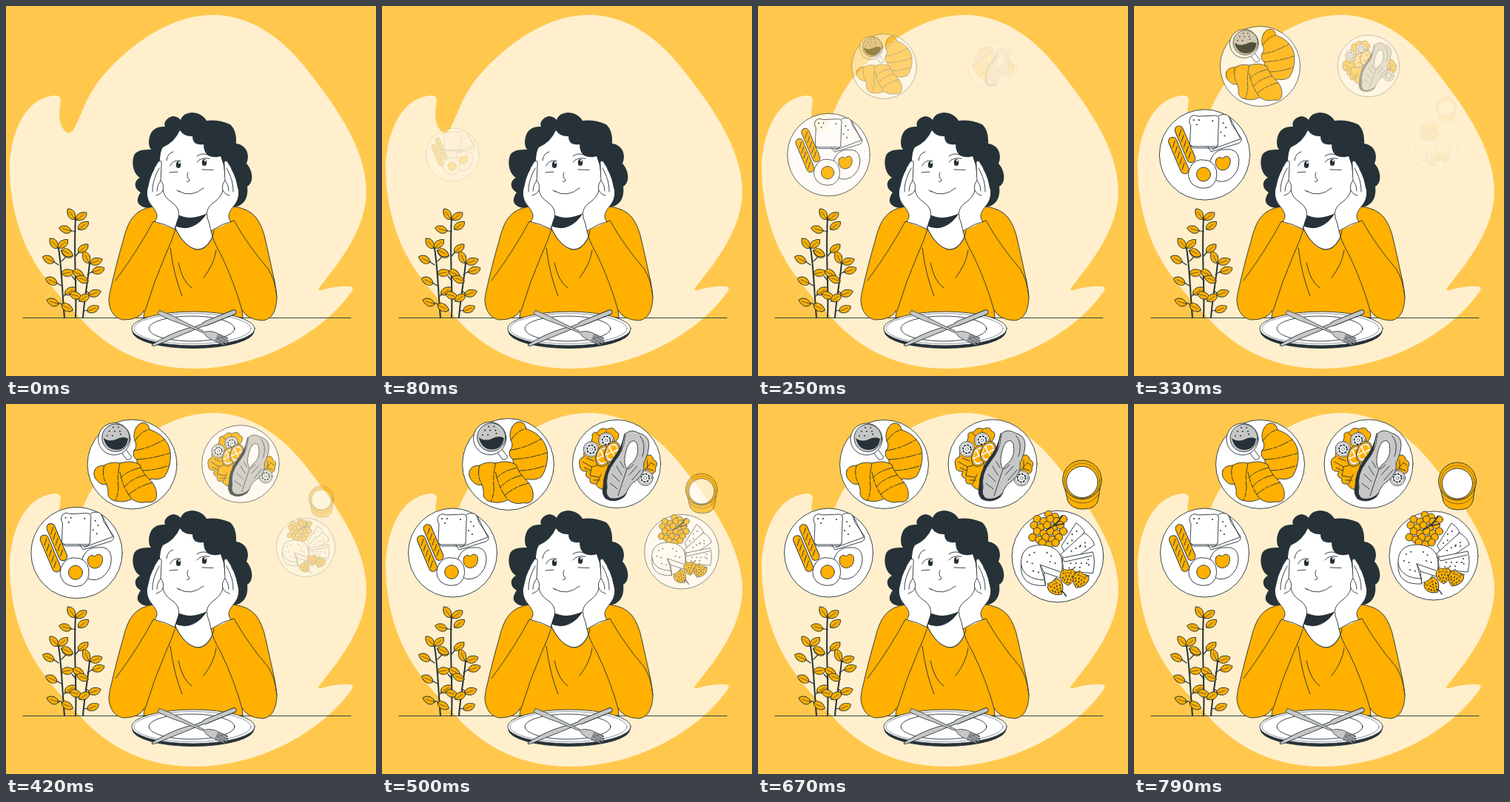
Write an HTML page that moves like this. It is 500 px wide and 500 px high and loops after 830 ms.

```html
<!DOCTYPE html>
<html lang="en">
<head>
<meta charset="utf-8">
<title>Thinking about breakfast</title>
<style>
  html, body { margin: 0; width: 100%; height: 100%; overflow: hidden; background: #ffc84d; }
  svg { display: block; width: 100%; height: 100%; }
  .art { stroke: #263238; stroke-width: .9; stroke-linejoin: round; stroke-linecap: round; fill: none; }
  .w { fill: #fff; }
  .o { fill: #ffb000; }
  .d { fill: #263238; }
  .g { fill: #c7c7c7; }
  .x { stroke: none; }
  .dash { stroke-dasharray: 14 2 6 2; }
  .dots { stroke-width: 2; stroke-dasharray: 0 7; }
</style>
</head>
<body>
<svg viewBox="0 0 500 500">
  <defs>
    <g id="leaf"><path class="o" d="M0 0Q1-5 8-5Q14-4 17 0Q14 5 8 5Q2 4 0 0Z"/><path d="M0 0L12 0" stroke-width=".6"/></g>
    <g id="hand">
      <path class="w" d="M200 293C207 284 204 279 197 270C190 262 189 252 192 243Q195 226 206 210Q211 207 210 215L209 236Q214 241 212 249Q214 259 225 266Q236 274 233 286Q230 293 228 304Z"/>
      <path d="M191 247Q193 231 200 221M198 251Q197 237 207 219M204 250Q204 242 209 236M212 249Q209 255 203 256"/>
    </g>
    <g id="cucumber">
      <circle class="w" r="10.5"/><circle r="8.5" stroke-width=".6"/>
      <circle r="5.500" stroke-width="2" stroke-dasharray="1.500 2.800"/>
      <circle r="2" stroke-width=".6"/>
    </g>
    <g id="citrus">
      <ellipse class="o" rx="10" ry="15"/><ellipse class="w" rx="8" ry="12.5" stroke-width=".5"/>
      <path class="o" stroke="#fff" d="M0 0L-6-7Q0-14 6-7ZL7 6Q0 14-6 7ZM-1 0L-7-6V6ZM1 0L7-6V6Z"/>
    </g>
    <g id="berry">
      <path class="o" d="M0-9Q9-13 10-4Q10 5 1 11Q-9 7-10-2Q-9-12 0-9Z"/>
      <path class="o" d="M0-9L-7-11L-5-7L-6-4L0-6L5-4L4-8L8-11Z" stroke-width=".6"/>
      <path d="M-6 0v1.500M-2-2v1.500M2-2v1.500M6-1v1.500M-4 3v1.500M0 2v1.500M4 3v1.500M-1 6v1.500M2 7v1" stroke-width="1.400"/>
    </g>
  </defs>

  <path fill="#ffefcc" d="M5 220C5 180 22 124 66 121Q74 121 74 127C72 140 70 158 79 168Q85 176 92 166C101 150 105 130 124 103C150 70 210 12 280 12C325 12 368 38 402 80C440 128 487 190 487 250C487 300 452 345 423 381Q421 385 426 384Q446 378 465 379Q471 380 467 386C425 445 340 490 255 490C190 490 140 465 103 425C85 405 52 372 35 340C15 305 5 260 5 220Z"/>

  <g class="art">
    <path d="M23 421.5H466"/>
    <g id="plant">
      <path stroke-width="2" d="M79 421C76 390 76 360 71 327M94 421C96 380 91 340 94 286M104 421C106 395 111 370 113 347"/>
      <path stroke-width="1.2" d="M71 350L64 345M75 378L68 374M77 403L70 401M75 345L82 338M94 305L86 303M94 338L100 331M108 385L114 389M110 363L118 358M105 412L112 411M95 372L89 365M95 397L102 394M78 392L84 388"/>
    </g>

    <g id="woman">
      <path class="d x" d="M225 285L196 273C185 274 176 268 178 260Q180 254 182 252C172 246 173 236 181 232C171 226 169 209 174 200Q179 193 196 194C191 188 193 176 197 170Q203 162 215 163C212 156 220 149 227 149Q233 150 236 154C240 141 262 140 271 155Q286 153 303 160Q312 168 311 186C322 187 331 198 325 213C333 221 336 238 326 244C328 260 321 272 304 272L270 285Z"/>
      <path class="o" d="M200 271Q181 273 171 286Q163 296 158 318Q150 345 142 380Q139 392 139 398C140 415 150 424 160 424Q180 424 187 411L186 421H320L319 411Q326 424 347 425Q364 423 366 396Q366 390 363 372Q357 345 351 318Q347 298 338 286Q328 273 306 271L281 304C280 314 272 329 260 329C250 329 236 318 228 298Z"/>
      <path class="w x" d="M228 296L236 276L272 280L282 303C280 314 272 328 260 328.500C250 329 236 318 228 296Z"/>
      <path class="d x" d="M232 280L273 278Q264 293 252 298Q240 303 228 297Z"/>
      <path class="w x" d="M208 211Q208 197 212 191Q228 184 235 168Q241 177 252 176Q252 189 267 187Q267 197 273 202Q281 206 290 203L294 215L298 250L274 279Q262 285 250 286Q240 286 230 281L205 250Z"/>
      <path d="M217 209Q218 199 226 197M258 203Q264 198 273 201M222 216Q224 208 236 209M258 211Q263 204 275 206M221 225L232 224M265 221L280 221.500M246 225Q243 231 248 235Q248 238 244 237M233 250Q250 260 267 246M231 249L235 251"/>
      <ellipse class="d x" cx="233" cy="214.500" rx="3.200" ry="4.600"/>
      <ellipse class="d x" cx="268" cy="211.500" rx="3.200" ry="4.600"/>
      <path class="w x" d="M233 211h2v2h-2zM268 208h2v2h-2z"/>
      <use href="#hand"/>
      <use href="#hand" transform="translate(505 0) scale(-1 1)"/>
      <path class="o x" d="M199 291L229 302Q224 318 216 335Q200 372 188 412L148 371Q181 326 199 291ZM308 290L277 304Q280 318 290 335Q307 372 319 411L363 376Q328 325 308 290Z"/>
      <path d="M148 371Q181 326 199 291Q214 294 229 302Q224 318 216 335Q200 372 188 412M366 393Q364 370 354 355Q328 325 308 290Q292 294 277 304Q280 318 290 335Q308 372 319 411M222 327Q227 365 238 392M233 347Q238 372 251 381M284 330Q281 350 267 367M228 298C236 318 250 329 260 329C272 328 280 312 281 304" stroke-dashoffset="0"/>
    </g>

    <g id="table-plate">
      <ellipse class="d" cx="253" cy="439.500" rx="82" ry="23"/>
      <ellipse class="w" cx="253" cy="436" rx="83" ry="23"/>
      <ellipse cx="252" cy="436" rx="79" ry="20.500" stroke-width=".5"/>
      <ellipse cx="251" cy="436" rx="58" ry="17"/>
      <g transform="translate(311 412.500) rotate(158)">
        <path class="g" d="M2-3Q-2 0 2 3L44 3L50 1.500H60Q85 7 122 1Q124-1 120-2H50L44-3Z"/>
      </g>
      <g transform="translate(206 413.500) rotate(24)">
        <path class="g" stroke-width=".7" d="M1-2.500Q-2 1 2 3Q20 4 36 2L68 1Q73 5 80 5H100V3.500H86V1.800H102V.3H86V-1.400H102V-2.900H86V-4.500H100V-6H80Q73-5 68-1L36-2Q20-4 1-2.500Z"/>
      </g>
    </g>

    <g id="eggs" opacity="0">
      <circle class="w" cx="95.500" cy="201" r="60"/>
      <path class="w" d="M112 152Q115 146 125 148Q129 151 131 160L144 179Q145 184 140 186L104 197L100 191Z"/>
      <path d="M129 152L143 180L105 194"/>
      <path class="w" d="M77 151Q80 147 87 150L109 149Q116 149 114 158L113 187Q113 191 108 190L79 190Q75 190 76 185L77 162Q73 156 77 151Z"/>
      <path d="M77 188L80 192H110L113 188"/>
      <path class="dots" d="M81 155H90M85 161H89M106 156H110M120 159L127 170M117 171L125 179"/>
      <g id="sausages"></g>
      <path class="w" d="M104 206Q110 193 124 194Q139 192 141 207Q142 224 128 234Q113 241 105 230Q98 218 104 206Z"/>
      <path class="o" d="M111 207Q115 202 119 206Q125 200 129 206Q131 213 126 219Q119 224 113 219Q108 213 111 207Z"/>
      <path class="w" d="M78 215Q84 206 95 208Q107 208 111 221Q114 237 102 244Q89 248 79 240Q69 228 78 215Z"/>
      <circle class="o" cx="94" cy="227" r="9.300"/>
    </g>

    <g id="croissants" opacity="0">
      <circle class="w" cx="170.500" cy="81.500" r="60"/>
      <path class="w" d="M155 64L163 75Q168 76 170 72L161 60"/>
      <circle class="w" cx="146.500" cy="47.500" r="21.500"/>
      <circle class="g" cx="148.500" cy="46" r="18.500"/>
      <path class="d x" d="M132 46Q139 52 149 48Q158 43 165 47Q163 62 149 62Q136 62 132 46Z"/>
      <path class="dots" d="M140 37H156M145 32H158M137 43H150M155 41H160" stroke-width="1.500"/>
      <path class="o" d="M176 32Q182 22 191 28Q194 33 194 35Q207 39 214 48Q222 57 222 70Q222 86 214 98Q206 103 198 101Q186 104 181 93Q177 88 177 76Q170 70 173 63Q178 57 174 50Q171 40 176 32Z"/>
      <path class="dash" d="M174 50Q182 37 194 35M173 63Q191 61 214 48M176 75Q199 74 222 66M180 90Q201 90 220 83"/>
      <path class="o" d="M120 90Q122 83 133 83Q143 77 154 80Q170 75 181 82Q184 93 194 102Q205 113 203 126Q201 134 190 132Q180 135 170 128Q161 133 150 131Q140 130 138 122Q139 116 136 108Q130 110 125 105Q117 98 120 90Z"/>
      <path class="dash" d="M133 83Q129 95 136 108M154 80Q150 98 152 112Q152 121 148 130M154 92Q158 113 170 128M182 86Q164 90 156 99M188 96Q170 100 160 112M198 106Q180 110 166 122"/>
    </g>

    <g id="fish" opacity="0">
      <circle class="w" cx="317" cy="81" r="60"/>
      <path class="o" d="M284 45Q282 37 291 38Q296 30 304 34Q313 29 316 37Q322 38 319 46L309 60L304 92L299 116Q291 114 288 108Q279 109 281 101Q272 98 277 91Q267 92 267 84Q264 73 273 71Q270 64 278 64Z"/>
      <path d="M271 78L283 85L294 82M283 85L281 97L293 99M290 40L299 46M303 36L304 45M290 108L296 95M273 86L282 90M286 103L294 103M276 73L286 77"/>
      <path class="o" d="M356 70Q366 66 367 75Q375 79 370 86Q372 94 362 95L350 108L344 96Z"/>
      <path d="M353 92L364 79L369 83M359 86V76M358 87L367 90"/>
      <use href="#cucumber" x="282.500" y="61"/>
      <use href="#cucumber" x="303" y="49"/>
      <use href="#cucumber" x="356" y="100"/>
      <use href="#citrus" transform="translate(299 70) rotate(18)"/>
      <use href="#citrus" transform="translate(311 65) rotate(20)"/>
      <path class="d" d="M328 40Q325 58 312 74Q299 92 299 111Q296 121 302 128Q314 135 327 126L331 120L312 118Z"/>
      <path class="g" d="M330 39Q338 33 347 39Q360 42 361 53Q361 67 354 80Q356 94 343 104Q335 108 330 121Q321 130 309 128Q301 124 304 113Q301 95 314 78Q327 62 328 47Z"/>
      <path class="w" d="M335 52Q342 46 345 54Q348 69 340 78Q334 82 331 88Q326 80 329 67Q331 57 335 52Z"/>
      <path d="M331 88L319 124M349 43Q358 54 352 71M345 84L334 96M350 89L338 103M317 84L324 96M311 95L321 105M308 107L318 115M340 82L333 88M322 78L327 86"/>
    </g>

    <g id="cheese" opacity="0">
      <path class="o" d="M412 106L418 132Q423 143 438 143Q455 143 458 131L462 106Z"/>
      <path d="M416 124Q424 135 438 135Q451 135 459 123" stroke-width=".6"/>
      <circle class="o" cx="437" cy="104.500" r="25.500"/>
      <circle cx="437" cy="106" r="23" stroke-width=".5"/>
      <circle class="w" cx="437" cy="107.500" r="20.500"/>
      <circle class="w" cx="405" cy="205" r="60"/>
      <g id="grapes"></g>
      <path d="M391 170Q402 165 411 152M399 165L413 162" stroke-width="1.600"/>
      <path class="w" d="M410 191L429 161Q437 166 440 173L416 203Z"/>
      <path class="w" d="M409 202L440 174Q451 181 453 190L419 213Z"/>
      <path class="w" d="M411 207L451 199Q455 212 451 227L413 224Z"/>
      <path d="M411 207L414 212L450 204"/>
      <path class="dots" d="M424 176L433 170M418 188L428 181M423 198L444 185M434 192L446 192M422 214H448M420 220L438 219M445 209L446 220"/>
      <path class="w" d="M357 215Q356 190 383 190Q410 191 411 215Q411 229 408 233L387 226L389 243Q359 245 357 222Z"/>
      <path d="M408 225L382 216L387 226M382 216Q386 230 388 236L389 243M357 215Q360 235 388 236"/>
      <path class="dots" d="M368 203L380 197M365 212L374 215M391 200L400 207M373 224L381 226M395 212L402 214"/>
      <use href="#berry" transform="translate(403 246) rotate(-35)"/>
      <use href="#berry" transform="translate(418 232)"/>
      <use href="#berry" transform="translate(434 236) rotate(30)"/>
      <path d="M410 250Q414 253 416 257" stroke-width="1.500"/>
    </g>
  </g>
</svg>
<script>
const $ = id => document.getElementById(id);
const add = (id, markup) => $(id).insertAdjacentHTML('beforeend', markup);

// Leaves: x, y of the stalk end, direction
const leaves = [
  [93, 288, -125], [95, 289, -35], [88, 304, 195], [98, 302, -38], [70, 327, -130], [71, 327, -42],
  [90, 338, 205], [98, 333, -40], [65, 346, 205], [75, 330, 25], [112, 347, -115], [114, 348, -20],
  [117, 360, -20], [69, 375, 205], [75, 362, -10], [90, 358, 25], [111, 372, 200], [80, 390, -35],
  [86, 389, 15], [99, 399, -35], [112, 391, -20], [71, 403, 200], [75, 404, 25], [110, 413, -25]
];
for (const [x, y, a] of leaves)
  add('plant', `<use href="#leaf" transform="translate(${x} ${y}) rotate(${a})"/>`);

for (const [x, y] of [[61, 202], [69.5, 187]]) {
  let cuts = '';
  for (let i = -18; i <= 16; i += 8) cuts += `M-3 ${i + 5}L3 ${i - 2}`;
  add('sausages', `<g transform="translate(${x} ${y}) rotate(-23)">
    <rect class="o" x="-5.500" y="-26" width="11" height="52" rx="5.500"/><path d="${cuts}"/></g>`);
}

// Grapes: row height, first x, count
for (const [y, x, n] of [[150, 393, 2], [156, 378, 5], [164, 374, 5], [172, 378, 5], [180, 372, 5], [187, 385, 3]])
  for (let i = 0; i < n; i++)
    add('grapes', `<circle class="o" cx="${x + i * 8.6}" cy="${y + i % 2 * 3}" r="5"/>`);

const LOOP = 830, FPS = 24, DUR = 500;
const pops = [
  ['eggs', 95.5, 201, -33], ['croissants', 170.5, 81.5, 67],
  ['fish', 317, 81, 167], ['cheese', 405, 172, 267]
].map(([id, x, y, start]) => ({ el: $(id), x, y, start }));

const bez = (s, a, b) => 3 * (1 - s) ** 2 * s * a + 3 * (1 - s) * s * s * b + s ** 3;

// cubic-bezier(.36, -.01, .5, 1.38)
function ease(x) {
  if (x <= 0) return 0;
  if (x >= 1) return 1;
  let lo = 0, hi = 1;
  for (let i = 0; i < 24; i++) {
    const mid = (lo + hi) / 2;
    if (bez(mid, .36, .5) < x) lo = mid; else hi = mid;
  }
  return bez(lo, -.01, 1.38);
}

const stepTime = k => Math.ceil(k * 100 / FPS - .5) * 10;

function draw(t) {
  let k = 0;
  while (stepTime(k + 1) <= t) k++;
  for (const { el, x, y, start } of pops) {
    const p = k < 2 ? 0 : ease((k * 1000 / FPS - start) / DUR);
    const s = .5 + p / 2;
    el.setAttribute('opacity', Math.max(0, Math.min(1, p)));
    el.setAttribute('transform', `translate(${x} ${y}) scale(${s}) translate(${-x} ${-y})`);
  }
}

const t0 = performance.now();
function tick(now) {
  draw(Math.max(0, now - t0) % LOOP);
  requestAnimationFrame(tick);
}
draw(0);
requestAnimationFrame(tick);
</script>
</body>
</html>
```
